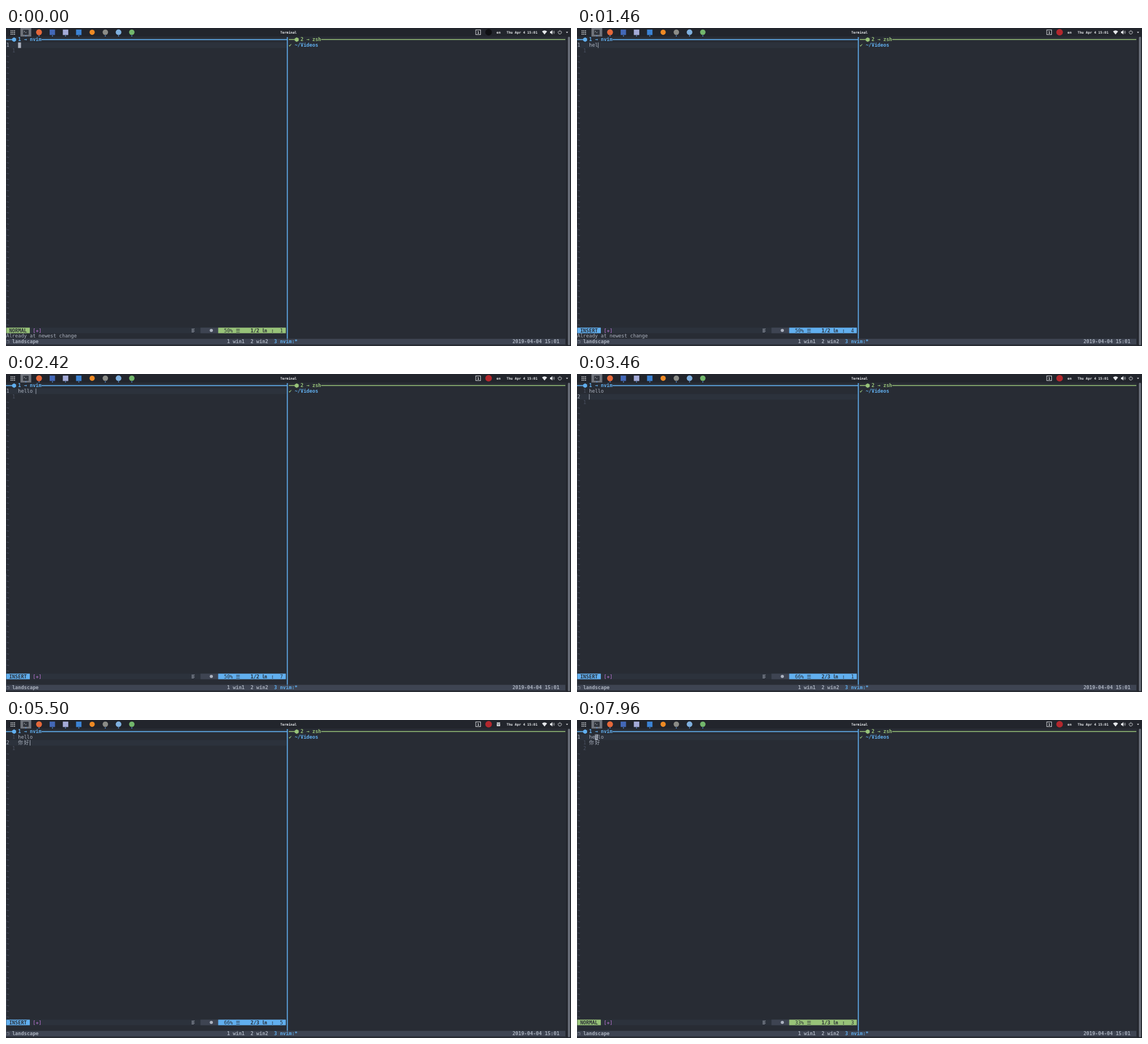
These frames come from a looping animation (997x561 px, 8000 ms). An HTML page:

```html
<!DOCTYPE html>
<html lang="en">
<head>
<meta charset="utf-8">
<title>Terminal</title>
<style>
html, body { margin: 0; width: 100%; height: 100%; overflow: hidden; background: #282c34; }
svg { display: block; width: 100%; height: 100%; }
text { font: 8.625px "DejaVu Sans Mono", "DejaVu Sans", "Noto Sans CJK SC", "Noto Sans CJK", monospace; white-space: pre; }
.bold { font-weight: 700; }
.bar { font-size: 6.05px; font-weight: 700; }
.han { font-family: "Noto Sans CJK SC", "Noto Sans CJK", sans-serif; }
.small { font-size: 7.2px; }
</style>
</head>
<body>
<svg viewBox="0 0 997 561">
  <g id="base"></g>
  <g id="live"></g>
</svg>
<script>
const LOOP = 8000, CELL = 5.1927, ROW = 9.866;
const BG = '#282c34', FG = '#abb2bf', DIM = '#4b5263', LINE = '#2c323c', SEGMENT = '#3e4452';
const BLUE = '#61afef', GREEN = '#98c379', PURPLE = '#c678dd', WHITE = '#e6e8eb';

const colX = col => 0.5 + col * CELL;
const rowY = row => 15.57 + row * ROW;
const rect = (x, y, w, h, fill, extra = '') =>
  `<rect x="${x}" y="${y}" width="${w}" height="${h}" fill="${fill}" ${extra}/>`;
const circle = (x, y, r, fill) => `<circle cx="${x}" cy="${y}" r="${r}" fill="${fill}"/>`;
const path = (d, stroke, width = 1, fill = 'none') =>
  `<path d="${d}" stroke="${stroke}" stroke-width="${width}" fill="${fill}"/>`;
const label = (x, y, str, fill, cls = '') => `<text x="${x}" y="${y}" fill="${fill}" class="${cls}">${str}</text>`;
const put = (col, row, str, fill, cls) => label(colX(col), rowY(row) + 7.9, str, fill, cls);
const cells = (col, row, count, fill) => rect(colX(col), rowY(row), count * CELL, ROW, fill);
const hexagon = (x, y, fill) => path(`M${x} ${y - 4}l3.5 2v4l-3.5 2l-3.5 -2v-4z`, 'none', 0, fill);
const range = n => [...Array(n).keys()];
const isHan = ch => ch > '\u2fff';

function topBar() {
  let out = rect(0, 0, 997, 15, '#22252c');
  for (const i of range(9)) out += rect(8.2 + i % 3 * 3, 4.2 + Math.floor(i / 3) * 3, 1.7, 1.7, '#d5d8dc');
  out += rect(25.5, 0, 19, 15, '#70747c') + rect(30, 3, 10, 9, '#30343c', 'rx="1"');
  out += path('M31.5 5l1.5 1.2l-1.5 1.2M34 8h2', '#c8ccd2', 0.7);
  out += circle(58.3, 7.5, 5.2, '#e5683a') + rect(77, 2.8, 9.5, 9.5, '#4368b8');
  out += rect(100.3, 2.8, 9.6, 9.6, '#a4abd8') + rect(123.6, 2.8, 9.6, 9.6, '#3b83d4');
  out += circle(152, 7.6, 4.6, '#ee8a24') + circle(175.3, 7.5, 4.8, '#8b8c87');
  out += circle(198.6, 7.5, 5, '#7fb0df') + circle(222, 7.5, 4.8, '#73b76c');
  for (const x of [35, 58.3, 82, 105, 128.5, 175.3, 198.6, 222]) out += circle(x, 14, 0.9, '#5294e2');

  out += label(483.9, 9.7, 'Terminal', WHITE, 'bar') + label(883.3, 9.7, 'Thu Apr 4 15:01', WHITE, 'bar');
  out += rect(829, 3.3, 8.4, 8.4, 'none', `stroke="${WHITE}" stroke-width=".9"`);
  out += label(831.4, 9.7, '1', WHITE, 'bar');
  out += path('M950.3 11.4L945.8 6Q950.3 2.4 954.8 6z', 'none', 0, WHITE);
  out += path('M960 6h1.8l2.4 -2.4v8l-2.4 -2.4h-1.8z', 'none', 0, WHITE);
  out += path('M965.3 6q1.2 1.5 0 3M966.7 4.6q2.4 3 0 5.8', WHITE, 0.7);
  out += path('M975.6 5.2a3 3 0 1 0 3.4 0M977.3 3.8v3.6', WHITE, 0.9);
  out += path('M988 6.7h4l-2 2.4z', 'none', 0, WHITE);
  return out;
}

function panes() {
  let out = rect(0, 19.6, 11, 1.7, BLUE) + rect(63, 19.6, 433, 1.7, BLUE);
  out += rect(495.6, 16, 1.7, 532.4, BLUE);
  out += hexagon(14.3, 20.5, BLUE) + put(4, 0, '1 → nvim', BLUE, 'bold');
  out += rect(499, 19.6, 11, 1.5, GREEN) + rect(556.3, 19.6, 430.7, 1.5, GREEN);
  out += hexagon(513, 20.5, GREEN) + put(100, 0, '2 → zsh', GREEN, 'bold');
  out += put(96, 1, '✔', GREEN) + put(98, 1, '~/Videos', BLUE, 'bold');
  out += rect(988, 15, 9, 546, '#24272e') + rect(991.6, 15.5, 3.6, 544, '#6d727d', 'rx="1.5"');
  out += rect(0, 352, 0.8, 196, '#444a57');

  out += rect(0, rowY(54), 987, ROW, SEGMENT);
  out += put(0, 54, '❐', FG) + put(2, 54, 'landscape', FG, 'bold');
  out += put(75, 54, '1 win1', FG, 'bold') + put(83, 54, '2 win2', FG, 'bold');
  return out + put(91, 54, '3 nvim:*', BLUE, 'bold') + put(172, 54, '2019-04-04 15:01', FG, 'bold');
}

const helWords = `help held helps helen hello helped helena helmet helpful helping helicopter heel hotel herald
hotels health hostel herbal healing heavily healthy himself heckler herself hostels homeland homeless handheld
headline handhelds headlines healthcare`.split(/\s+/);

// Each step changes only the listed properties of the state before it.
const steps = [
  [0, { lines: ['', ''], row: 0, col: 0, mode: 'NORMAL', msg: 'Already at newest change', words: [],
        recording: false, pinyin: '', choices: '', chinese: false, pointer: false }],
  [60, { recording: true }],
  [800, { mode: 'INSERT' }],
  [1170, { lines: ['h', ''], col: 1 }],
  [1340, { lines: ['he', ''], col: 2 }],
  [1460, { lines: ['hel', ''], col: 3 }],
  [1540, { words: helWords, msg: '' }],
  [1640, { lines: ['hell', ''], col: 4, words: ['hello', 'helpful'] }],
  [1810, { lines: ['hello', ''], col: 5, words: ['hello'] }],
  [2040, { lines: ['hello ', ''], col: 6, words: [] }],
  [2960, { lines: ['hello', '', ''], row: 1, col: 0 }],
  [4040, { chinese: true, pointer: true }],
  [4630, { pinyin: 'n', choices: '你 年 难 那 能 呢 您 内 拿 哪' }],
  [4790, { pinyin: 'ni', choices: '你 呢 尼 泥 拟 逆 腻 妮 倪 匿' }],
  [4950, { pinyin: 'nih', choices: '你好 你会 你和 你还 你很 你后 你或 你回 你花 你换' }],
  [5090, { pinyin: 'niha', choices: '你好 你还 你害 你喊 拟好 你 呢 尼 泥 拟' }],
  [5210, { pinyin: 'nihao', choices: '你好 拟好 你 呢 尼 泥 拟 逆 腻 妮' }],
  [5420, { pinyin: '' }],
  [5460, { lines: ['hello', '你好', ''], col: 4, pointer: false }],
  [6440, { mode: 'NORMAL', col: 2, chinese: false }],
  [7380, { row: 2, col: 0 }],
  [7580, { row: 1, col: 2 }],
  [7920, { row: 0, col: 2 }]
];
const states = [];
for (const [at, change] of steps) states.push({ ...states.at(-1), ...change, at });

function buffer({ lines, row, col, mode }) {
  let out = rect(0, rowY(row + 1), 495, ROW, LINE);
  const block = mode === 'NORMAL';
  lines.forEach((line, i) => {
    const y = i + 1, current = i === row;
    out += current ? put(0, y, i + 1, FG) : put(2, y, Math.abs(i - row), DIM);
    const under = [...line].find((ch, k) => (isHan(ch) ? 2 * k : k) === col);
    if (current && block) out += cells(4 + col, y, under && isHan(under) ? 2 : 1, FG);
    [...line].forEach((ch, k) => {
      const at = isHan(ch) ? 2 * k : k;
      out += put(4 + at, y, ch, current && block && at === col ? BG : FG, isHan(ch) ? 'han' : '');
    });
    if (current && !block) out += rect(colX(4 + col), rowY(y), 0.9, ROW, FG);
  });
  for (let y = lines.length + 1; y < 52; y++) out += put(0, y, '~', DIM);
  return out;
}

function statusLine({ lines, row, col, mode, msg, words }) {
  const tint = mode === 'NORMAL' ? GREEN : BLUE;
  const name = words.length ? 'INSERT COMPL' : mode;
  const total = lines.length, y = 52;
  let out = cells(0, y, 95, LINE) + cells(0, y, name.length + 2, tint) + cells(66, y, 6, SEGMENT) + cells(72, y, 23, tint);
  out += put(1, y, name, BG, 'bold') + put(name.length + 3, y, '[+]', PURPLE);
  out += path('M327.5 531h5.5M327.5 532.8h4M327.5 534.6h5.5M327.5 536.4h4', FG, 0.8) + circle(362.3, 533.5, 2.8, FG);
  out += put(74, y, `${Math.floor((row + 1) / total * 100)}% ☰`, BG);
  out += put(83, y, `${row + 1}/${total}`, BG, 'bold') + put(87, y, '㏑', BG, 'bold') + put(90, y, ':', BG, 'bold');
  out += put(93, y, col + 1, BG);
  return out + (words.length ? put(0, 53, `match 1 of ${words.length}`, BLUE, 'bold') : put(0, 53, msg, FG));
}

function wordMenu(words) {
  if (!words.length) return '';
  const width = Math.max(...words.map(w => w.length)) + 1;
  return rect(colX(3), rowY(2), (width + 7) * CELL, words.length * ROW, '#333841') +
    words.map((w, i) => put(4, i + 2, w, FG) + put(4 + width, i + 2, '[10K]', FG)).join('');
}

function candidatePanel({ pinyin, choices }) {
  if (!pinyin) return '';
  let x = 12.6, items = '';
  choices.split(' ').forEach((word, i) => {
    const width = 15.1 + 7.2 * word.length;
    if (!i) items += rect(x, 65.5, width, 14.3, '#4a90d9', 'rx="1"');
    items += label(x + 4, 74.9, (i + 1) % 10, WHITE, 'bar') + label(x + 11.3, 75.2, word, WHITE, 'han small');
    x += width;
  });
  x += 4.6;
  const panel = path(`M10 51.5H19L24 46.8L29 51.5H${x + 27.6}V82.5H10z`, '#252931', 0.8, '#30353f');
  items += rect(x, 66, 12.2, 13.5, '#3a3f4a') + rect(x + 12.6, 66, 12.2, 13.5, '#444a56');
  items += path(`M${x + 8.5} 72.8h-5m2 -2l-2 2l2 2`, '#8b919c', 0.9);
  items += path(`M${x + 16} 72.8h5m-2 -2l2 2l-2 2`, WHITE, 1.1);
  return panel + label(13, 61.2, pinyin + '_', WHITE, 'small');
  }

function tray({ recording, chinese }) {
  const icon = rect(866, 4.4, 6, 6.4, WHITE) + path('M866 6.4h6M867 8.5h4', '#22252c', 0.7);
  return circle(851.6, 7.5, 5.8, recording ? '#b3282e' : '#0f1013') +
    (chinese ? icon : label(865.5, 9.7, 'en', WHITE, 'bar'));
}

const pointer = path('M295.8 319.4q2.6 0 2.6 1.2q0 -1.2 2.6 -1.2M298.4 320.4v6M295.8 327.4q2.6 0 2.6 -1.2q0 1.2 2.6 1.2', '#f4f4f4', 1.1);
const live = document.getElementById('live');
let shown;

function frame() {
  const time = performance.now() % LOOP;
  const state = states.findLast(s => s.at <= time);
  if (state !== shown) {
    shown = state;
    live.innerHTML = buffer(state) + statusLine(state) + wordMenu(state.words) + candidatePanel(state) +
      tray(state) + (state.pointer ? pointer : '');
  }
  requestAnimationFrame(frame);
}

document.getElementById('base').innerHTML = topBar() + panes();
frame();
</script>
</body>
</html>
```
